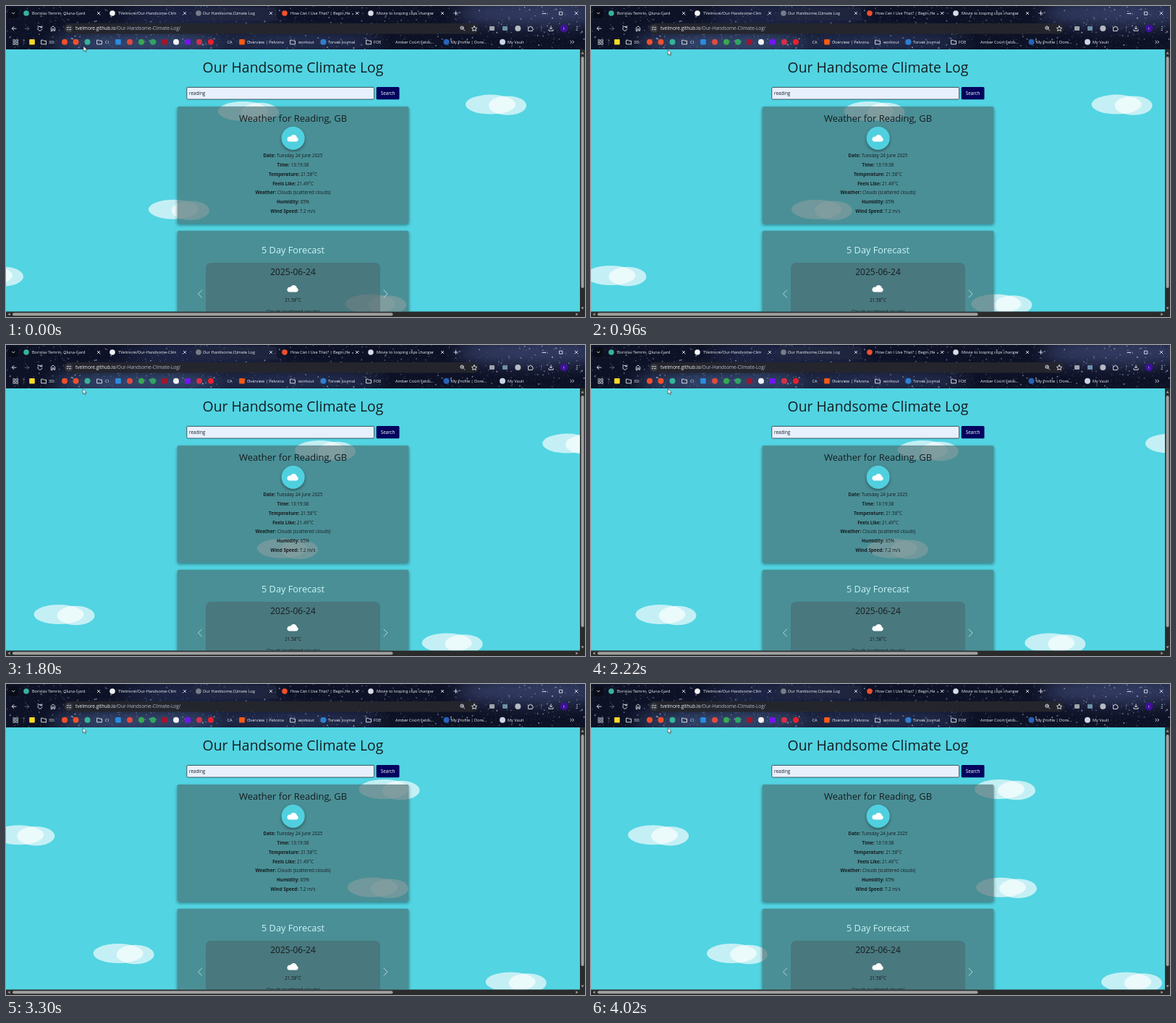
These frames come from a looping animation (800 by 430 pixels, 4080 ms). An HTML page:

```html
<!DOCTYPE html>
<html lang="en">
<head>
<meta charset="utf-8">
<title>Weather page</title>
<style>
html, body { margin: 0; width: 100%; height: 100%; overflow: hidden; background: #52d4e2; }
svg { display: block; width: 800px; height: 430px; }
text { font-family: "Open Sans", "Noto Sans", sans-serif; white-space: pre; }
.chrome text { font-size: 5.6px; fill: #eef0f5; }
.line { fill: none; stroke: #e6e8ee; stroke-width: .9; stroke-linecap: round; stroke-linejoin: round; }
.page text { font-size: 6.3px; fill: #161d20; text-anchor: middle; }
.page .label { font-weight: 700; }
</style>
</head>
<body>
<svg viewBox="0 0 800 430">
  <defs>
    <clipPath id="viewport"><rect y="60" width="793" height="362.5"/></clipPath>
    <clipPath id="header"><rect width="800" height="60"/></clipPath>
    <filter id="shadow" x="-10%" y="-10%" width="120%" height="120%">
      <feGaussianBlur in="SourceAlpha" stdDeviation="2"/>
      <feOffset dy="2" result="blur"/>
      <feComposite in="blur" in2="SourceAlpha" operator="out"/>
    </filter>
    <filter id="haze" x="-50%" y="-100%" width="200%" height="300%"><feGaussianBlur stdDeviation="11"/></filter>
    <path id="puff" d="M2.5 10.5 H13 A3 3 0 0 0 13.4 4.8 A4.6 4.6 0 0 0 4.6 3.8 A3.4 3.4 0 0 0 2.5 10.5 Z" fill="#fff"/>
    <g id="cloud" fill="#fff" fill-opacity=".66">
      <ellipse cx="34.5" cy="13.5" rx="34.5" ry="13.5"/>
      <ellipse cx="58" cy="15" rx="26" ry="13.2"/>
    </g>
  </defs>

  <g class="page" clip-path="url(#viewport)">
    <rect y="60" width="793" height="363" fill="#52d4e2"/>
    <g id="clouds"></g>
    <g id="cards"></g>
    <rect x="276" y="355" width="241" height="90" rx="7" fill="#48555a" fill-opacity=".4"/>
    <text x="396.5" y="92" style="font-size:19.4px">Our Handsome Climate Log</text>
    <rect x="249.8" y="112.4" width="258.8" height="16.6" rx="1.5" fill="#e8f0fe" stroke="#26343c" stroke-width=".8"/>
    <text x="253" y="123.2" style="text-anchor:start">reading</text>
    <rect x="511.7" y="112" width="31.8" height="17.2" rx="1.5" fill="#03045e"/>
    <text x="527.6" y="123" style="fill:#fff">Search</text>
    <text x="396.5" y="160.3" style="font-size:13px">Weather for Reading, GB</text>
    <circle cx="396.7" cy="182.7" r="16" filter="url(#shadow)" opacity=".4"/>
    <circle cx="396.7" cy="182.7" r="16" fill="#50d0df"/>
    <use href="#puff" x="388.5" y="177"/>
    <g id="facts"></g>
    <text x="396.5" y="342" style="font-size:12.8px;fill:#c9f4f8">5 Day Forecast</text>
    <text x="396.5" y="372.2" style="font-size:12px">2025-06-24</text>
    <use href="#puff" x="388.5" y="385"/>
    <text x="396.5" y="409.2">21.58°C</text>
    <text x="396.5" y="425">Clouds (scattered clouds)</text>
    <path class="line" d="M270.5 393l-5 5 5 5M522 393l5 5-5 5" style="stroke:#c4dcdf"/>
  </g>

  <g id="bars" fill="#a0a0a0">
    <rect x="793" y="60" width="7" height="370" fill="#2b2b2c"/>
    <rect y="422.5" width="800" height="7.5" fill="#2b2b2c"/>
    <rect x="794.6" y="70" width="4" height="320" rx="2"/>
    <rect x="9" y="424.3" width="525.5" height="4" rx="2"/>
    <path d="M796.6 63.2l2 3.2h-4zM796.6 419.6l2-3.2h-4zM2.4 426.3l3.2-2v4zM790.6 426.3l-3.2-2v4z"/>
  </g>

  <g class="chrome" clip-path="url(#header)">
    <rect width="800" height="60" fill="#0e1226"/>
    <g filter="url(#haze)" opacity=".75">
      <ellipse cx="270" cy="12" rx="110" ry="12" fill="#2b3561"/>
      <ellipse cx="190" cy="52" rx="130" ry="13" fill="#4c6699"/>
      <ellipse cx="400" cy="50" rx="120" ry="12" fill="#33406c"/>
      <ellipse cx="730" cy="10" rx="110" ry="18" fill="#414b78"/>
    </g>
    <g id="stars" fill="#c6d2f5"></g>
    <path d="M254 20q4 0 4-4V6q0-4 4-4h108q4 0 4 4v10q0 4 4 4z" fill="#22283f" fill-opacity=".65"/>
    <rect x="3" y="3" width="14" height="14" rx="4" fill="#0a0d18"/>
    <rect x="80" y="24" width="573" height="14.5" rx="7.2" fill="#25262d" fill-opacity=".95"/>
    <circle cx="87" cy="31.2" r="5.2" fill="#393b43"/>
    <g id="tabs"></g>
    <g id="bookmarks"></g>
    <text x="96" y="33.4" style="font-size:6.5px">tvelmore.github.io<tspan fill="#b4b8c8">/Our-Handsome-Climate-Log/</tspan></text>
    <g class="line">
      <path d="M8.5 9.2l1.7 1.7 1.7-1.7M621.5 7.5v5M619 10h5M741 10.5h4.5M764.8 8.2h4v4h-4zM786 8l4 4M790 8l-4 4"/>
      <path d="M14 31.2H8.3m2.6-2.6l-2.6 2.6 2.6 2.6"/>
      <path d="M26 31.2h5.7m-2.6-2.6l2.6 2.6-2.6 2.6" opacity=".4"/>
      <path d="M49.3 29.3a3 3 0 1 0 .6 2.6M49.8 27.8v2h-2M62.3 34.2v-4l2.7-2.3 2.7 2.3v4h-1.8v-2.5h-1.8v2.5z"/>
      <path d="M84.5 29.8h2m1.5 0h1.5M84.5 32.6h1m2 0h2"/>
      <circle cx="630" cy="30.2" r="2.2"/><path d="M631.7 32l2 2M629 30.2h2"/>
      <path d="M647 27.7l1.1 2.3 2.5.3-1.8 1.7.5 2.5-2.3-1.2-2.3 1.2.5-2.5-1.8-1.7 2.5-.3z"/>
      <path d="M722 29.3h1.5a1.2 1.2 0 0 1 2.4 0h1.3v1.6a1.2 1.2 0 0 1 0 2.4v1.2H722z"/>
      <path d="M753 27.8v4m-1.8-1.6l1.8 1.8 1.8-1.8M750 32.5v1.8h6v-1.8"/>
      <path d="M739.5 27.5v7.5M24.3 46v8" opacity=".25"/>
      <path d="M780 48l1.6 1.8-1.6 1.8M783 48l1.6 1.8-1.6 1.8"/>
    </g>
    <rect x="668" y="28" width="7" height="6" rx="1" fill="#a0a3a9"/>
    <rect x="686" y="28" width="7" height="6" rx="1" fill="#6d8fa8"/>
    <circle cx="707.3" cy="31" r="4" fill="#b7bac0"/>
    <circle cx="771" cy="31" r="5.4" fill="#40109c"/>
    <text x="770" y="33" style="font-size:5px">t</text>
    <g fill="#e6e8ee"><circle cx="789" cy="28.5" r=".7"/><circle cx="789" cy="31" r=".7"/><circle cx="789" cy="33.5" r=".7"/></g>
    <g id="grid"></g>
  </g>
  <path id="pointer" d="M0 0v7.2l1.7-1.5 1.2 2.6 1.2-.5-1.2-2.5h2.3z" fill="#fff" stroke="#111" stroke-width=".5"/>
</svg>
<script>
const LOOP = 4080, STEP = 60;
const $ = id => document.getElementById(id);
const fill = (id, items, draw) => { $(id).innerHTML = items.map(draw).join(""); };

let seed = 29;
const random = () => (seed = (seed * 16807) % 2147483647) / 2147483647;
fill("stars", Array.from({ length: 1300 }), () => {
  const size = .35 + random() ** 4 * .8;
  return `<circle cx="${random() * 800}" cy="${random() * 60}" r="${size}" opacity="${.15 + random() * .5}"/>`;
});

// icon x, icon colour, text x, title, close button x
fill("tabs", [
  [28, "#36b39a", 36, "Borislav Temrin, Oluna-Gard", 128],
  [147, "#f2f2f4", 155, "TVelmore/Our-Handsome-Clim", 247],
  [266, "#777d89", 272, "Our Handsome Climate Log", 366],
  [385, "#f0502c", 393, "How Can I Use That? | Begin He", 485],
  [504, "#d9dce6", 512, "Movie to looping clips changer", 603]
], ([icon, color, x, title, close]) =>
  `<circle cx="${icon}" cy="10" r="3.8" fill="${color}"/><text x="${x}" y="12.2">${title}</text>
   <path class="line" d="M${close - 1.7} 8.3l3.4 3.4m0-3.4l-3.4 3.4"/>`);

const folder = x => `<path class="line" d="M${x - 3} 47.2h2.3l1 1h3.2v4.6h-6.5z"/>`;
const square = (x, color) => `<rect x="${x - 3.8}" y="46" width="7.6" height="7.6" rx="1" fill="${color}"/>`;
const dot = (x, color) => `<circle cx="${x}" cy="49.8" r="4" fill="${color}"/>`;
const caption = (x, label) => `<text x="${x}" y="51.9">${label}</text>`;
$("bookmarks").innerHTML = [
  square(36, "#f7d928"), folder(52), caption(59, "3D:"),
  dot(81, "#f0502c"), dot(96.5, "#f0502c"), dot(112.5, "#36b39a"),
  folder(129), caption(137, "CI"), square(155, "#2a8de0"),
  dot(171, "#e34a3c"), dot(187, "#38a852"), dot(203, "#2fa562"),
  square(219, "#a3152c"), dot(235, "#f2f2f4"), square(251, "#7513f4"),
  dot(267, "#d5304a"), dot(283, "#e7202c"),
  caption(305.5, "CA"), square(326, "#fc5a14"), caption(333, "Overview | Pelvona"),
  folder(396), caption(404, "workout"), dot(438.5, "#2f7fd0"), caption(445, "Torvek Journal"),
  folder(501), caption(508, "FOE"), caption(538, "Amber Court Felds..."),
  dot(608.5, "#2763b8"), caption(615, "My Profile | Dore..."),
  dot(686, "#c9d5e6"), caption(693, "My Vault")
].join("");
fill("grid", [0, 1, 2, 3], i =>
  `<rect x="${10 + (i % 2) * 4}" y="${46.8 + (i >> 1) * 4}" width="2.4" height="2.4" fill="none" stroke="#d8dbe3" stroke-width=".8"/>`);

fill("cards", [[139, 162], [310.7, 140]], ([y, height]) => {
  const box = `x="236.6" y="${y}" width="320" height="${height}" rx="2.5"`;
  return `<rect ${box} filter="url(#shadow)" opacity=".4"/><rect ${box} fill="#466b6d" fill-opacity=".65"/>`;
});

fill("facts", [
  ["Date", "Tuesday 24 June 2025"], ["Time", "13:19:38"], ["Temperature", "21.58°C"],
  ["Feels Like", "21.49°C"], ["Weather", "Clouds (scattered clouds)"],
  ["Humidity", "65%"], ["Wind Speed", "7.2 m/s"]
], ([label, value], i) =>
  `<text x="396.5" y="${209.2 + i * 12.8}"><tspan class="label">${label}:</tspan> ${value}</text>`);

// start x, top y, speed in px per ms
const clouds = [
  [293, 132, .05896], [635, 122.6, .05896], [197, 267.7, .08333],
  [-60, 359, .05473], [469, 398.4, .0587], [-327.5, 195.2, .09417]
];
fill("clouds", clouds, () => `<use href="#cloud"/>`);
const cloudNodes = [...$("clouds").children];

function render(t) {
  clouds.forEach(([x, y, speed], i) =>
    cloudNodes[i].setAttribute("transform", `translate(${x + speed * t} ${y})`));
  const p = Math.min(t / 420, 1), ease = p * (2 - p);
  $("pointer").setAttribute("transform", `translate(${107 - .8 * ease} ${55.5 + 5 * ease})`);
}

const start = performance.now();
function tick() {
  const t = (performance.now() - start) % LOOP;
  render(Math.floor(t / STEP) * STEP);
  requestAnimationFrame(tick);
}
render(0);
tick();
</script>
</body>
</html>
```
